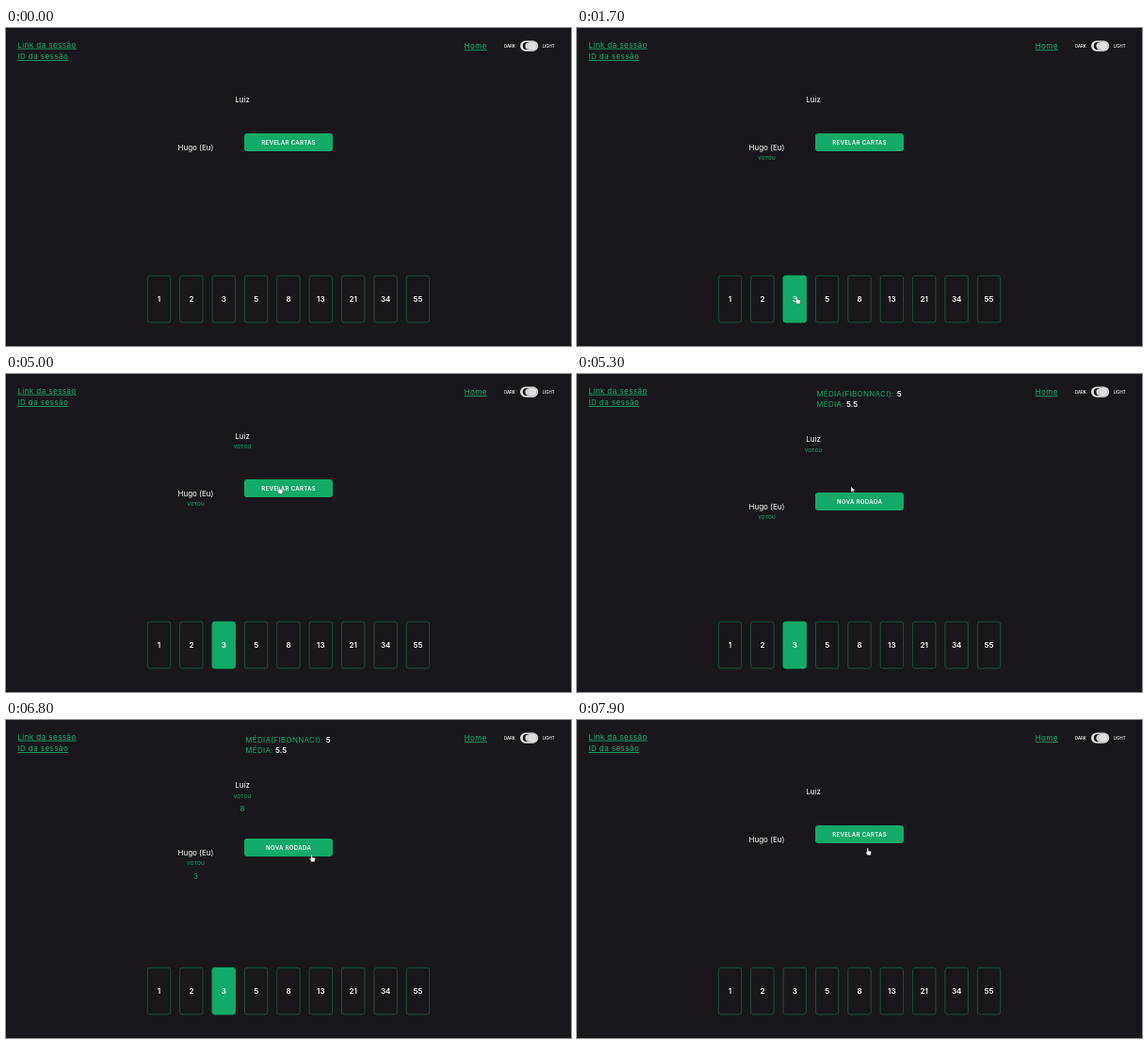
Animation, 600 px wide and 338 px high, one loop 8000 ms. Source, as an HTML page:

```html
<!DOCTYPE html>
<html lang="pt">
<head>
<meta charset="utf-8">
<style>
  html, body { margin: 0; height: 100%; overflow: hidden; background: #19171b; }
  svg { display: block; width: 100vw; height: 100vh; }
  text { font: 8px Inter, "Open Sans", sans-serif; fill: #fff; }
  .mid { text-anchor: middle; }
  .green { fill: #13a968; }
  .link { fill: #13b671; letter-spacing: .45px; text-decoration: underline; text-underline-offset: 1.2px; }
  .avg { letter-spacing: .3px; }
  .bold { font-weight: 600; }
  .voted { font-size: 5px; font-weight: 500; letter-spacing: .2px; }
  .label { font-size: 6px; font-weight: 600; letter-spacing: .35px; }
  .tiny { font-size: 4.3px; font-weight: 500; }
</style>
</head>
<body>
<svg viewBox="0 0 600 338">
  <text class="link" x="12.3" y="20.7">Link da sessão</text>
  <text class="link" x="12.3" y="33.2">ID da sessão</text>
  <text class="link" x="486.7" y="21.9">Home</text>

  <text class="tiny" x="529" y="20.6">DARK</text>
  <rect x="546" y="13.5" width="19.2" height="11.2" rx="5.6" fill="#dfdee1"/>
  <circle cx="552.8" cy="19.1" r="4" fill="#19171b"/>
  <circle cx="555" cy="19.1" r="3.6" fill="#dfdee1"/>
  <circle cx="558.8" cy="19.1" r="5" fill="#dfdee1" stroke="#a9a8ad" stroke-width=".5"/>
  <text class="tiny" x="569.7" y="20.6">LIGHT</text>

  <g id="average">
    <text class="avg green" x="254.3" y="24">MÉDIA(FIBONNACI):</text>
    <text class="bold" x="339.7" y="24">5</text>
    <text class="avg green" x="254.3" y="34.9">MÉDIA:</text>
    <text class="bold" x="286" y="34.9">5.5</text>
  </g>

  <g id="guest">
    <text class="mid" x="251" y="0">Luiz</text>
    <text class="mid voted green" x="251" y="10.3">VOTOU</text>
    <text class="mid green score" x="251" y="24.9">8</text>
  </g>
  <g id="me">
    <text class="mid" x="201.5" y="0">Hugo (Eu)</text>
    <text class="mid voted green" x="201.6" y="10.3">VOTOU</text>
    <text class="mid green score" x="201.5" y="35.9" dy="-.4" style="transform:translateY(-10.6px)">3</text>
  </g>

  <g id="button">
    <rect class="green" x="253" y="0" width="94" height="19" rx="3"/>
    <text class="mid label" x="300.1" y="11.7"></text>
  </g>

  <g id="cards"></g>

  <g id="cursor" stroke-linejoin="round">
    <path id="arrow" d="M0 0V6.3L1.5 5 2.5 7.2 3.5 6.7 2.5 4.6H4.4Z" fill="#fff" stroke="#000" stroke-width=".4"/>
    <path id="hand" d="M-.7 .6Q0-.4 .7 .6V3L3 3.5Q4 3.8 3.8 4.9L3.2 7.7H-.1L-2 5Q-2.2 3.9-.7 4.5Z" fill="#fff" stroke="#222" stroke-width=".35"/>
  </g>
</svg>
<script>
const LOOP = 8000, STEP = 100;
const VOTE = 1000, GUEST_VOTE = 3000, REVEAL = 5300, RESET = 7900;
const $ = q => document.querySelector(q);
const clamp = v => Math.max(0, Math.min(1, v));
const show = (q, on) => $(q).style.opacity = +on;
const move = (q, x, y) => $(q).setAttribute("transform", `translate(${x} ${y})`);

$("#cards").innerHTML = [1, 2, 3, 5, 8, 13, 21, 34, 55].map((n, i) => {
  const x = 150.3 + i * 34.37;
  const box = `x="${x}" y="263.3" width="24.4" height="49.6" rx="2.5"`;
  return `<rect ${box} fill="none" stroke="#17613f" stroke-width=".8"/>` +
    (n === 3 ? `<rect id="pick" class="green" ${box} stroke="#13a968" stroke-width=".8"/>` : "") +
    `<text class="mid bold" x="${x + 12.2}" y="290.9">${n}</text>`;
}).join("");

// Pointer strokes: [time, x, y]
const strokes = [
  [[100, 345, 60], [500, 265, 225], [900, 233, 285], [1500, 233, 285], [1700, 233.5, 285.5], [2100, 285, 332]],
  [[3900, 591.5, 172], [4300, 385, 133], [4700, 293, 118], [5000, 290.2, 119.5], [5300, 291, 119.5],
   [5600, 310, 131], [6700, 310, 131], [6800, 324.5, 143], [7100, 350, 176],
   [7300, 345, 168], [7600, 310, 137], [7700, 308.7, 136], [8000, 308.7, 136]]
];

function pointer(t) {
  for (const s of strokes) {
    for (let i = 1; i < s.length; i++) {
      const [t0, x0, y0] = s[i - 1], [t1, x1, y1] = s[i];
      if (t < t0 || t > t1) continue;
      const k = (t - t0) / (t1 - t0);
      return [x0 + (x1 - x0) * k, y0 + (y1 - y0) * k];
    }
  }
}

function draw(t) {
  const voted = t >= VOTE && t < RESET;
  const guestVoted = t >= GUEST_VOTE && t < RESET;
  const open = t >= REVEAL && t < RESET;
  const buttonY = open ? 126 : 112;

  show("#average", open);
  show("#me .voted", voted);
  show("#guest .voted", guestVoted);
  move("#me", 0, open ? 143.7 : 129.6);
  move("#guest", 0, open ? 72.4 : guestVoted ? 69.1 : 78.5);
  const score = open ? clamp((t - 5600) / 400) : 0;
  show("#me .score", 0);
  $("#me .score").style.opacity = $("#guest .score").style.opacity = score;
  $("#pick").style.opacity = voted ? clamp((t - VOTE + 100) / 400) : 0;

  move("#button", 0, buttonY);
  $("#button text").textContent = open ? "NOVA RODADA" : "REVELAR CARTAS";

  const p = pointer(t);
  show("#cursor", !!p);
  if (!p) return;
  const [x, y] = p;
  move("#cursor", x, y);
  const onButton = x > 253 && x < 347 && y > buttonY && y < buttonY + 19;
  const onCard = y > 263 && y < 313 && x > 150 && (x - 150.3) % 34.37 < 25;
  const over = onButton || onCard || t >= RESET;
  show("#hand", over);
  show("#arrow", !over);
}

function tick() {
  draw(Math.floor(performance.now() % LOOP / STEP) * STEP);
  requestAnimationFrame(tick);
}
tick();
</script>
</body>
</html>
```
